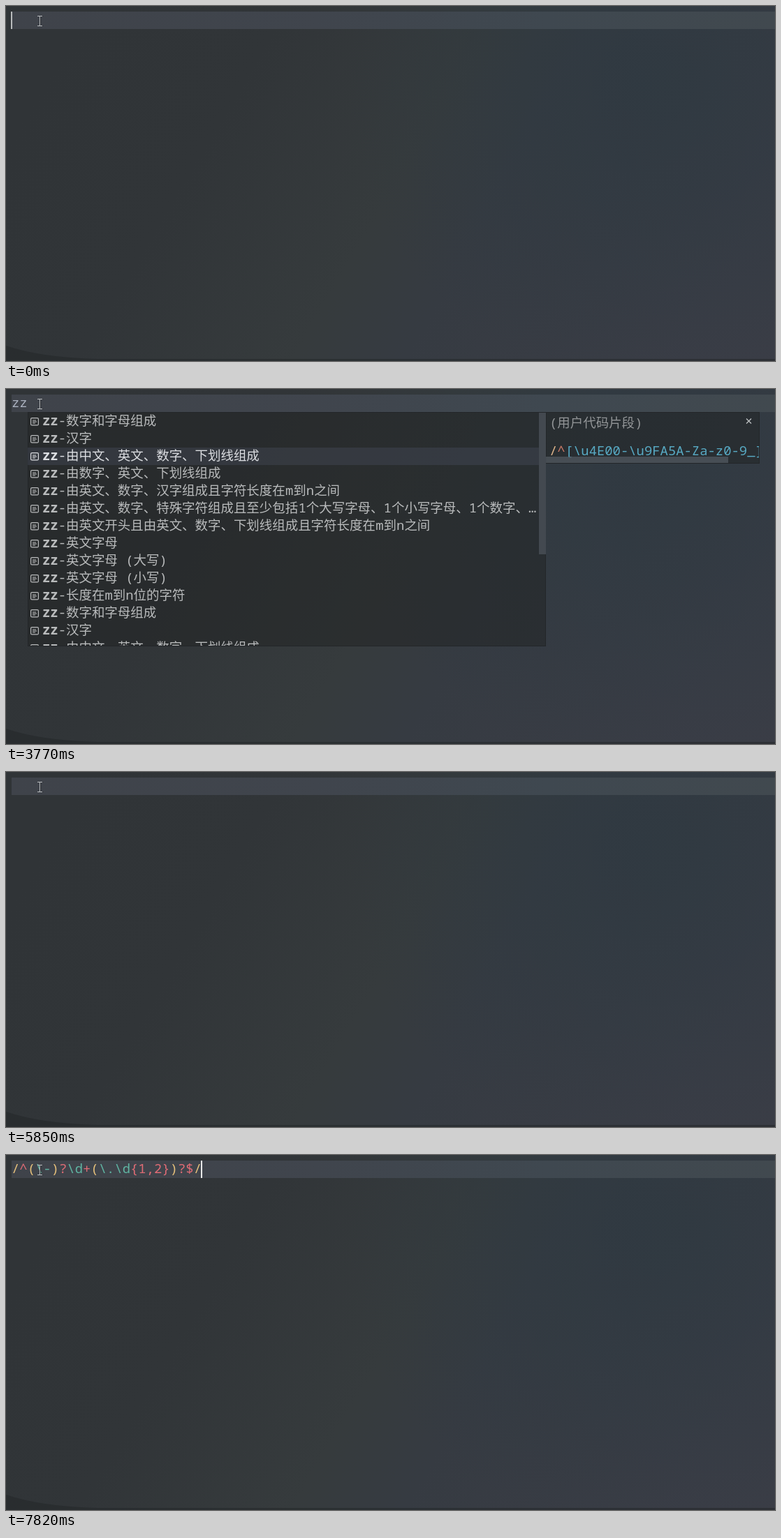
Write an HTML page with a canvas that moves like this. It is 1101 px wide and 509 px high and loops after 8 s.

```html
<!DOCTYPE html>
<html lang="zh-CN">
<head>
<meta charset="utf-8">
<style>
  html, body { margin: 0; width: 100%; height: 100%; overflow: hidden; background: #33383b; }
  canvas { display: block; }
</style>
</head>
<body>
<canvas id="stage" width="1101" height="509"></canvas>
<script>
const ctx = document.getElementById('stage').getContext('2d');
const W = 1101, H = 509, LOOP = 8000;
const CHAR = 340 / 30, ROW = 25, LIST_W = 742, LIST_H = 335, DETAIL_W = 306;
const MONO = '18.89px "Noto Sans Mono", "DejaVu Sans Mono", monospace';
const CJK = '18.47px "Noto Sans CJK SC", "Noto Sans CJK", sans-serif';

const RED = '#e06c75', CYAN = '#56b6c2', GREEN = '#5fb3a1', YELLOW = '#e5c07b',
      PEACH = '#deb48a', RUST = '#cf7c69', BLUE = '#58aac4';

// Code is a list of [colour, text] pieces.
const alnum = [[PEACH, '/'], [RUST, '^'], [BLUE, '[A-Za-z0-9]'], [RUST, '+$'], [PEACH, '/']];
const hanzi = [[PEACH, '/'], [RUST, '^'], [YELLOW, '(?:'], [BLUE, '[\\u3400-\\u4DB5\\u4E00-\\u9FEA']];
const WORD = '[\\u4E00-\\u9FA5A-Za-z0-9_]';
const word = [[PEACH, '/'], [RUST, '^'], [BLUE, WORD], [RUST, '+$'], [PEACH, '/']];
const range = [[PEACH, '/'], [RUST, '^'], [BLUE, '\\d'], [YELLOW, '{m,n}'], [RUST, '$'], [PEACH, '/']];
const digits = [[PEACH, '/'], [RUST, '^'], [BLUE, '\\d'], [YELLOW, '{n}'], [RUST, '$'], [PEACH, '/']];
const decimal = (slash, anchor, escape, count) => [
  [slash, '/'], [anchor, '^'], [YELLOW, '('], [escape, '\\-'], [YELLOW, ')'], [anchor, '?'],
  [escape, '\\d'], [anchor, '+'], [YELLOW, '('], [escape, '\\.\\d'], [count, '{1,2}'],
  [YELLOW, ')'], [anchor, '?$'], [slash, '/']];
const typed = text => [['#abb2bf', text]];
const wordLine = slash => [[slash, '/'], [RED, '^'], [CYAN, WORD], [RED, '+$'], [slash, '/']];

const zItems = ['数字和字母组成', '汉字', '由中文、英文、数字、下划线组成', '由数字、英文、下划线组成',
  '由英文、数字、汉字组成且字符长度在m到n之间',
  '由英文、数字、特殊字符组成且至少包括1个大写字母、1个小写字母、1个数字、…',
  '由英文开头且由英文、数字、下划线组成且字符长度在m到n之间',
  '英文字母', '英文字母 (大写)', '英文字母 (小写)', '长度在m到n位的字符'];
const lists = {
  zz: { items: [...zItems, ...zItems.slice(0, 3)], details: [alnum, hanzi, word], thumb: 203 },
  ss: {
    items: ['m到n位的数字', 'n位的数字', '带1-2位小数的正数或负数', '数字', '有1~3位小数的正实数',
      '有两位小数的正实数', '正数、负数、和小数', '正浮点数', '浮点数', '至少n位的数字', '负浮点数',
      '零和非零开头的数字', '非正整数', '非正浮点数'],
    details: [range, digits, decimal(PEACH, RUST, BLUE, YELLOW)], thumb: 39
  }
};

// Each entry changes part of the editor state from its time on.
const timeline = [
  [0, { line: [], caret: 1, list: '', row: 0, bar: 0, slider: 0, selected: 0, bulb: 0 }],
  [320, { caret: 0 }],
  [790, { caret: 1 }],
  [1070, { line: typed('z') }],
  [1140, { list: 'zz' }],
  [1460, { bar: 1 }],
  [1640, { line: typed('zz') }],
  [2110, { caret: 0 }],
  [2580, { caret: 1 }],
  [2710, { row: 1 }],
  [3030, { slider: 23 }],
  [3220, { row: 2, slider: 0 }],
  [3540, { slider: 261 }],
  [3770, { caret: 0 }],
  [3980, { line: wordLine(YELLOW), list: '', row: 0, bar: 0, slider: 0, caret: 1 }],
  [4080, { line: wordLine('#e08078') }],
  [4540, { caret: 0 }],
  [4600, { caret: 1, selected: 1 }],
  [4860, { bulb: 1 }],
  [5080, { caret: 0 }],
  [5330, { line: [], caret: 1, selected: 0, bulb: 0 }],
  [5830, { caret: 0 }],
  [5890, { line: typed('s'), caret: 1 }],
  [6000, { list: 'ss' }],
  [6340, { bar: 1 }],
  [6370, { line: typed('ss') }],
  [6850, { caret: 0 }],
  [7120, { row: 1 }],
  [7270, { row: 2 }],
  [7340, { caret: 1 }],
  [7820, { line: decimal(YELLOW, RED, GREEN, RED), list: '', row: 0, bar: 0 }]
];

function stateAt(time) {
  const state = {};
  for (const [start, change] of timeline) if (start <= time) Object.assign(state, change);
  return state;
}

function rect(x, y, w, h, color) {
  ctx.fillStyle = color;
  ctx.fillRect(x, y, w, h);
}

function clipped(x, y, w, h, draw) {
  ctx.save();
  ctx.beginPath();
  ctx.rect(x, y, w, h);
  ctx.clip();
  draw();
  ctx.restore();
}

// Draws mixed Latin and Chinese text and returns its right edge.
function drawText(text, x, y, color, weight = 400) {
  ctx.fillStyle = color;
  for (const run of text.match(/[\u3000-\u9fff]+|[^\u3000-\u9fff]+/g) || []) {
    const chinese = run[0] >= '\u3000';
    ctx.font = weight + ' ' + (chinese ? CJK : MONO);
    ctx.fillText(run, x, y);
    x += run.length * (chinese ? 18.47 : CHAR);
  }
  return x;
}

function drawCode(pieces, x, y) {
  for (const [color, text] of pieces) x = drawText(text, x, y, color, 500);
  return x;
}

function gradient(g, stops) {
  stops.forEach(([at, color]) => g.addColorStop(at, color));
  ctx.fillStyle = g;
}

function drawBackground() {
  gradient(ctx.createLinearGradient(120, 0, 960, 500),
    [[0, '#303437'], [0.25, '#313538'], [0.52, '#363b3d'], [0.66, '#363b42'], [1, '#3a3d46']]);
  ctx.fillRect(0, 0, W, H);
  gradient(ctx.createRadialGradient(930, 110, 20, 930, 110, 440),
    [[0, 'rgba(46,57,65,.75)'], [0.4, 'rgba(46,57,65,.5)'], [1, 'rgba(46,57,65,0)']]);
  ctx.fillRect(0, 0, W, H);
  ctx.fillStyle = 'rgba(36,39,41,.55)';
  ctx.beginPath();
  ctx.moveTo(0, 487);
  ctx.quadraticCurveTo(50, 504, 130, 506);
  ctx.lineTo(W, 506);
  ctx.lineTo(W, H);
  ctx.lineTo(0, H);
  ctx.fill();
}

function drawPanel(x, w, h) {
  rect(x, 33, w, h, 'rgba(32,34,35,.5)');
  ctx.strokeStyle = '#232629';
  ctx.lineWidth = 1;
  ctx.strokeRect(x + 0.5, 33.5, w - 1, h);
}

function drawIcon(x, y, color) {
  ctx.strokeStyle = color;
  ctx.lineWidth = 1.2;
  ctx.beginPath();
  ctx.roundRect(x + 0.6, y + 0.6, 10.8, 10.3, 1.5);
  ctx.stroke();
  [[3.5, 5], [5.5, 6], [7.5, 4]].forEach(([dy, w]) => rect(x + 3, y + dy, w, 1, color));
}

function drawList(state, left, matched) {
  const { items, thumb } = lists[state.list];
  drawPanel(left, LIST_W, LIST_H);
  clipped(left, 34, LIST_W, LIST_H - 1, () => {
    rect(left, 34 + state.row * ROW, LIST_W, ROW, 'rgba(80,88,106,.3)');
    items.forEach((item, i) => {
      const y = 34 + i * ROW, color = i === state.row ? '#dcdee2' : '#b9bbbc';
      drawIcon(left + 4, y + 7, color);
      const x = drawText(state.list.slice(0, matched), left + 21, y + 17.5, color, 800);
      drawText(state.list.slice(matched) + '-' + item, x, y + 17.5, color);
    });
    if (state.bar) rect(left + LIST_W - 10, 34, 10, thumb, '#434950');
  });
}

function drawDetail(state, left) {
  drawPanel(left, DETAIL_W, 73);
  clipped(left, 34, DETAIL_W - 1, 72, () => {
    drawText('(用户代码片段)', left + 5, 55, '#929597');
    drawCode(lists[state.list].details[state.row], left + 5, 95);
    if (state.slider) rect(left, 97, state.slider, 9, 'rgba(82,88,96,.75)');
  });
  ctx.strokeStyle = '#c0c3c5';
  ctx.lineWidth = 1.2;
  ctx.beginPath();
  for (const d of [-3.5, 3.5]) {
    ctx.moveTo(left + 290.5 - d, 42.5);
    ctx.lineTo(left + 290.5 + d, 49.5);
  }
  ctx.stroke();
}

function drawBulb(x) {
  ctx.fillStyle = '#f9c80e';
  ctx.beginPath();
  ctx.arc(x, 14, 5, 0, 7);
  ctx.fill();
  rect(x - 2.5, 17, 5, 3, '#f9c80e');
  rect(x - 2, 20.5, 4, 1.5, '#f9c80e');
}

function drawPointer() {
  ctx.lineWidth = 1;
  for (const [offset, color] of [[1, 'rgba(25,27,30,.7)'], [0, '#b9bcbe']]) {
    ctx.strokeStyle = color;
    ctx.beginPath();
    ctx.moveTo(48.5 + offset, 15);
    ctx.lineTo(48.5 + offset, 28);
    for (const y of [14.5, 28.5]) {
      ctx.moveTo(45 + offset, y);
      ctx.lineTo(52 + offset, y);
    }
    ctx.stroke();
  }
}

function draw(time) {
  const state = stateAt(time);
  const count = state.line.reduce((sum, piece) => sum + piece[1].length, 0);
  drawBackground();
  if (state.selected) {
    ctx.fillStyle = '#434950';
    ctx.beginPath();
    ctx.roundRect(8, 8, count * CHAR, 25, 3);
    ctx.fill();
  } else {
    gradient(ctx.createLinearGradient(8, 0, W, 0),
      [[0, '#3f434a'], [0.4, '#40454d'], [0.7, '#3f4850'], [1, '#41494f']]);
    ctx.fillRect(8, 8, W - 8, 25);
  }
  drawCode(state.line, 8, 26);
  if (state.list) {
    const left = Math.round(8 + count * CHAR);
    drawList(state, left, count);
    drawDetail(state, left + LIST_W);
  }
  if (state.bulb) drawBulb(355.5);
  if (state.caret) rect(Math.floor(7 + count * CHAR), 8, 2, 25, count ? '#e8e8e8' : '#b9bbbc');
  drawPointer();
}

const start = performance.now();
function tick() {
  draw((performance.now() - start) % LOOP);
  requestAnimationFrame(tick);
}
tick();
</script>
</body>
</html>
```
